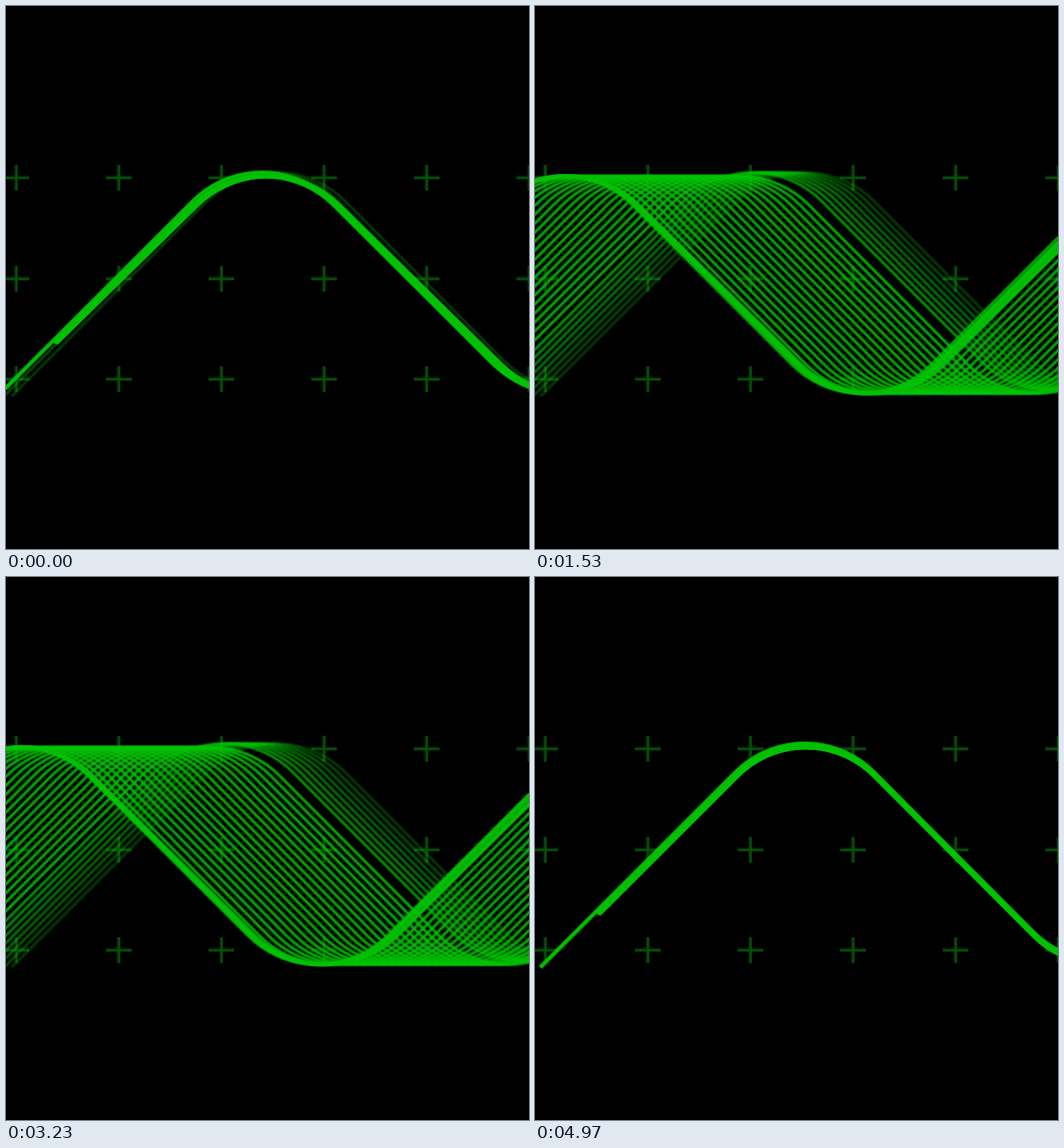
These frames come from a looping animation (734 px wide and 763 px high, 5010 ms). A matplotlib script:

```python
import numpy as np
import matplotlib.pyplot as plt
from matplotlib.animation import FuncAnimation
from matplotlib.collections import LineCollection

W, H, DPI = 734, 763, 100
PX = 72 / DPI                      # points per pixel
FRAMES, INTERVAL = 334, 15

PEAK_X, HALF = 376, 418            # first crest, distance crest to trough
TOP, BOTTOM, RADIUS = 239, 544.5, 137
SPEED, REACH, MIDDLE = 6.93, 438, 73.1
REST, BRAKE = 7, 11.5
GREEN = (0.01, 0.76, 0.015)
GRID = (0.03, 0.33, 0.04)


def wave(start):
    """Straight 45 degree flanks joined by round crests and troughs."""
    turn = np.radians(np.linspace(-45, 45, 19))
    pts = [[(start, PEAK_X + TOP - RADIUS * (np.sqrt(2) - 1) - start)]]
    for n in range(3):
        x = PEAK_X + HALF * n + RADIUS * np.sin(turn)
        rise = RADIUS * (1 - np.cos(turn))
        y = BOTTOM - rise if n % 2 else TOP + rise
        pts.append(np.column_stack([x, y]))
    return np.vstack(pts)


faint_stops = np.arange(8) * 10.5
main_stops = np.append(89 + 12.6 * np.arange(25), [415, REACH])
faint_wave = wave(5) + (3, -5)
main_wave = wave(85)


def travel(step):
    """Distance of the leading strand: steady run, soft stop, and back."""
    a = abs(step - MIDDLE)
    if a < REST:
        gap = 0
    elif a < REST + BRAKE:
        gap = SPEED * (a - REST) ** 2 / (2 * BRAKE)
    else:
        gap = SPEED * (a - REST - BRAKE / 2)
    return max(0, REACH - gap)


def strands(step):
    s = travel(step)
    segs = [faint_wave - (min(s, stop), 0) for stop in faint_stops]
    # strands with a long way to go trail behind, more so to the right
    fan = 6 + 22 * min(1, s / 40) * (main_wave[:, 0] - 85) / 490
    for stop in main_stops:
        seg = main_wave.copy()
        lag = np.sqrt(max(0, stop - s) / REACH)
        seg[:, 0] += lag * fan - min(s, stop)
        segs.append(seg)
    return segs


fig = plt.figure(figsize=(W / DPI, H / DPI), dpi=DPI, facecolor="black")
ax = fig.add_axes([0, 0, 1, 1])
ax.set(xlim=(0, W), ylim=(H, 0))
ax.axis("off")


def soft_lines(segs, color, alphas):
    """A core stroke over a wider, weaker one."""
    layers = []
    for width, strength in ((6.2, 0.3), (3.3, 0.85)):
        layer = LineCollection(segs, colors=[(*color, a * strength) for a in alphas],
                               linewidths=width * PX, capstyle="butt")
        layers.append(ax.add_collection(layer))
    return layers


marks = []
for cx in 14 + 144 * np.arange(6):
    for cy in (241, 383, 524):
        marks += [[(cx - 18, cy), (cx + 18, cy)], [(cx, cy - 18), (cx, cy + 18)]]
soft_lines(marks, GRID, [1])

alphas = np.append(np.linspace(0.25, 0.7, len(faint_stops)),
                   np.full(len(main_stops), 0.88))
layers = soft_lines(strands(0), GREEN, alphas)


def update(i):
    # the picture advances 30 times a second
    step = min(149, int((i * INTERVAL + 10) * 0.03 + 1e-6))
    segs = strands(step)
    for layer in layers:
        layer.set_segments(segs)
    return layers


anim = FuncAnimation(fig, update, frames=FRAMES, interval=INTERVAL,
                     repeat=True, repeat_delay=0, blit=False)
plt.show()
```
